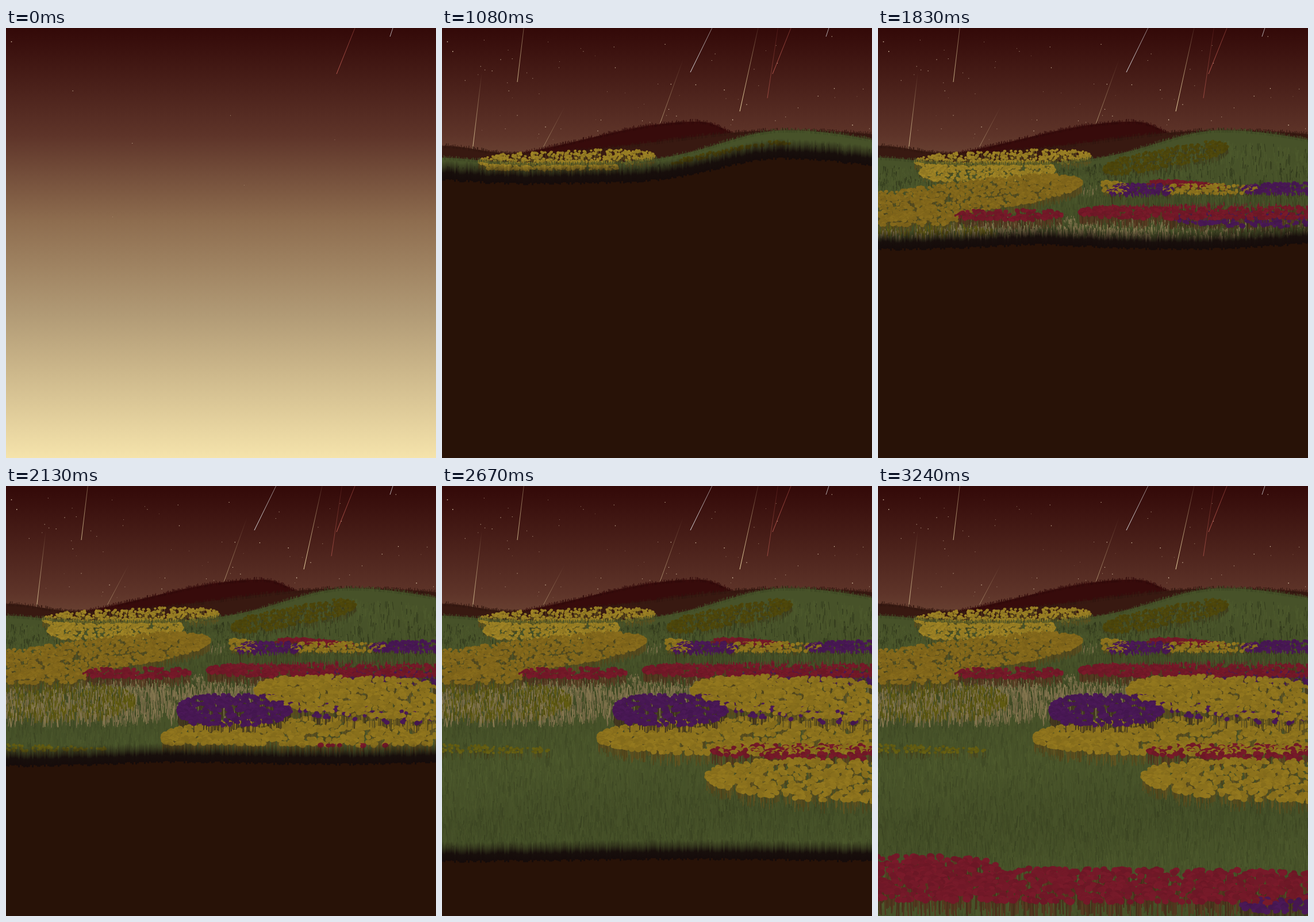
These frames come from a looping animation (748x748 px, 9 s). An HTML page with a canvas:

```html
<!DOCTYPE html>
<html lang="en">
<head>
<meta charset="utf-8">
<title>Meadow under meteors</title>
<style>
  html, body { margin: 0; width: 100%; height: 100%; overflow: hidden; background: #281207; }
  canvas { display: block; width: 748px; height: 748px; }
</style>
</head>
<body>
<canvas id="stage" width="748" height="748"></canvas>
<script>
const SIZE = 748, LOOP = 9000, STEP = 30;
const stage = document.getElementById('stage').getContext('2d');
const layer = document.createElement('canvas');
layer.width = layer.height = SIZE;
const ctx = layer.getContext('2d');

let seed = 7;
const rnd = () => {
  seed = (seed + 0x6D2B79F5) | 0;
  let n = Math.imul(seed ^ (seed >>> 15), 1 | seed);
  n = (n + Math.imul(n ^ (n >>> 7), 61 | n)) ^ n;
  return ((n ^ (n >>> 14)) >>> 0) / 4294967296;
};
const between = (a, b) => a + (b - a) * rnd();
const mix = (a, b, k) => a + (b - a) * k;
const shade = (rgb, k) => `rgb(${rgb.map(v => Math.min(255, Math.round(v * k)))})`;

const GREEN = [71, 82, 41], BEIGE = [132, 118, 79], GOLD = [152, 126, 36], YELLOW = [140, 114, 29],
      AMBER = [130, 103, 27], OLIVE = [98, 92, 18], MOSS = [77, 70, 11], RED = [115, 25, 40],
      PURPLE = [72, 24, 84], MAROON = [55, 11, 11], BROWN = [56, 25, 17],
      CREAM = [255, 236, 180], PALE = [235, 240, 245], CORAL = [230, 110, 100];

// Terrain profiles: bell curves with separate left and right widths.
const bump = (x, peak, left, right = left) =>
  Math.exp(-(((x - peak) / (x < peak ? left : right)) ** 2) / 2);
const maroonHill = x => 240 - 77 * bump(x, 445, 195, 75);
const brownHill = x => 224 - 18 * bump(x, 0, 60) - 46 * bump(x, 600, 210, 260);
const greenHill = x => 236 - 10 * bump(x, 0, 60) - 58 * bump(x, 600, 115, 180);
const fronts = [
  [1020, x => greenHill(x) + 30],
  [1380, x => 303 + 11 * bump(x, 0, 100) - 6 * bump(x, 250, 80) + 27 * bump(x, 650, 95, 140)],
  [1830, x => 386 - 8 * bump(x, 280, 90) - 11 * bump(x, 780, 90)],
  [2430, x => 590 - 8 * bump(x, 430, 170)],
  [2940, () => 726],
  [3240, () => 850]
];

// Lower edge of the meadow at a moment, and the moment it reaches a height.
function front(x, t) {
  let i = 0;
  while (i < fronts.length - 2 && t > fronts[i + 1][0]) i++;
  const [t0, from] = fronts[i], [t1, to] = fronts[i + 1];
  return mix(from(x), to(x), Math.max(0, Math.min(1, (t - t0) / (t1 - t0))));
}
function timeAt(x, y) {
  let t = 1050;
  while (t < 3240 && front(x, t) < y) t += STEP;
  return t;
}

const items = [];
const add = (t, y, draw) => items.push({ t: Math.floor(t / STEP) * STEP, y, draw });

function stroke(x0, y0, x1, y1, width, style) {
  ctx.lineWidth = width;
  ctx.strokeStyle = style;
  ctx.beginPath();
  ctx.moveTo(x0, y0);
  ctx.lineTo(x1, y1);
  ctx.stroke();
}

function addBlade(t, x, y, height, width, style) {
  const lean = between(-.15, .15) * height;
  add(t, y, () => stroke(x, y, x + lean, y - height, width, style));
}

function addStar(t) {
  const x = between(0, SIZE), y = between(0, 374), size = between(.6, 1.5), alpha = between(.4, .95);
  add(t, y, () => {
    ctx.fillStyle = `rgba(255,240,205,${alpha})`;
    ctx.fillRect(x, y, size, size);
  });
}

let meteors = 0;
function addMeteor(x, y, slope, rgb, alpha = .7) {
  const length = 160;
  add(Math.max(0, meteors++ - 1) * 60, y, () => {
    const g = ctx.createLinearGradient(x, y, x + slope * length, y - length);
    g.addColorStop(0, `rgba(${rgb},${alpha})`);
    g.addColorStop(1, `rgba(${rgb},0)`);
    stroke(x, y, x + slope * length, y - length, 1, g);
  });
}

function addHill(t, profile, rgb) {
  add(t, 0, () => {
    ctx.fillStyle = shade(rgb, 1);
    ctx.beginPath();
    ctx.moveTo(0, SIZE);
    for (let x = 0; x <= SIZE; x += 4) ctx.lineTo(x, profile(x));
    ctx.lineTo(SIZE, SIZE);
    ctx.fill();
  });
  for (let x = 0; x < SIZE; x += 1.6)
    addBlade(t, x, profile(x) + 4, between(4, 9), 1, shade(rgb, between(.8, 1.05)));
}

// A spindle-shaped bed from (x0,y0) to (x1,y1), planted when the front is `lift` below it.
function plant(cover, area, x0, x1, y0, y1, half, lift, place) {
  const count = cover * Math.abs(x1 - x0) * half * 1.8 / area;
  for (let i = 0; i < count; i++) {
    const u = rnd(), x = mix(x0, x1, u);
    const taper = Math.sqrt(1 - Math.abs(2 * u - 1) ** 4);
    const y = mix(y0, y1, u) + between(-1, 1) * half * taper;
    if (x > -12 && x < SIZE + 12) place(x, y, timeAt(x, y + lift));
  }
}

function flowers(rgb, x0, x1, y0, y1, half, size, lift, cover = 2) {
  plant(cover, 2 * size * size, x0, x1, y0, y1, half, lift, (x, y, t) => {
    const r = size * between(.7, 1.1), tilt = between(-.5, .5);
    const head = shade(rgb, between(.93, 1.06));
    const stem = shade([mix(rgb[0], 75, .6), mix(rgb[1], 75, .7), 34], between(.75, 1));
    add(t, y, () => {
      stroke(x, y, x + tilt * 3, y + size * 4.5, size * .35, stem);
      ctx.fillStyle = head;
      ctx.beginPath();
      ctx.ellipse(x, y, r, r * .8, tilt, 0, 7);
      ctx.fill();
    });
  });
}

function tufts(rgb, x0, x1, y0, y1, half, height, lift, cover = 1.2) {
  plant(cover, 1.5 * height, x0, x1, y0, y1, half, lift, (x, y, t) =>
    addBlade(t, x, y + height / 2, height * between(.7, 1.2), between(1, 2), shade(rgb, between(.82, 1.06))));
}

// Sky
for (let i = 0; i < 175; i++) addStar(i < 7 ? 0 : between(30, 720));
addMeteor(668, 15, .33, PALE);
addMeteor(575, 80, .4, CORAL);
addMeteor(131, 94, .12, CREAM);
addMeteor(50, 238, .12, CREAM, .9);
addMeteor(128, 298, .53, CREAM, .9);
addMeteor(162, 366, .19, CREAM);
addMeteor(270, 363, .45, CORAL, .9);
addMeteor(296, 332, .18, CREAM, .4);
addMeteor(362, 214, .36, CREAM);
addMeteor(432, 77, .49, PALE, .9);
addMeteor(518, 145, .22, CREAM, .9);
addMeteor(566, 122, .15, CORAL, .5);
addMeteor(505, 315, .14, CORAL, .15);

// Hills
addHill(750, maroonHill, MAROON);
addHill(780, brownHill, BROWN);
addHill(1050, greenHill, GREEN);

// Grass
for (let i = 0; i < 25000; i++) {
  const t = between(1050, 3240), x = between(-4, SIZE + 4), y = front(x, t) - 8;
  const valley = bump(x, 350, 55) * bump(y, 242, 12);
  const light = (1 + .05 * Math.sin(y / 36 + x / 400)) * (1 - .38 * valley);
  const dark = rnd() < .2 ? (y < 290 ? .75 : .9) : 1;
  addBlade(t, x, y, between(9, 14) + y * .012, between(1, 2.4), shade(GREEN, light * dark * between(.94, 1.05)));
}

// Far slope
flowers(GOLD, 64, 370, 233, 222, 14, 2.8, 24, 1);
flowers(GOLD, 72, 308, 252, 246, 18, 2.8, 24, 1.6);
flowers(MOSS, 392, 608, 246, 206, 17, 2.8, 24, 1.2);
tufts(BEIGE, 345, 500, 287, 291, 8, 13, 12, .8);
flowers(RED, 468, 740, 270, 298, 10, 3.2, 22);

// Middle slope
tufts(GREEN, 375, 840, 292, 296, 14, 14, 42, 3);
flowers(RED, 483, 580, 268, 274, 5, 3.4, 60);
flowers(YELLOW, 387, 434, 275, 280, 10, 3.6, 60);
flowers(YELLOW, 495, 660, 281, 280, 9, 3.6, 60, 1.4);
flowers(PURPLE, 400, 512, 283, 282, 11, 3.6, 60);
flowers(PURPLE, 635, 850, 281, 278, 11, 3.6, 60);
tufts(GREEN, 350, 900, 300, 298, 5, 14, 60, 3);
flowers(AMBER, -200, 354, 338, 268, 27, 3.6, 40);
flowers(AMBER, -60, 142, 331, 332, 12, 4, 40, 1.4);
flowers(RED, 136, 320, 326, 325, 9, 4, 40);
flowers(RED, 350, 900, 320, 316, 14, 4, 40);
flowers(PURPLE, 512, 1000, 331, 338, 13, 4.2, 32, 1.5);

// Near slope
tufts(BEIGE, 110, 900, 356, 354, 20, 18, 10);
tufts(BEIGE, -80, 480, 386, 376, 30, 18, 18);
tufts(OLIVE, -140, 225, 376, 376, 30, 14, 22);
flowers(YELLOW, 434, 1100, 354, 396, 35, 5, 58, 2.4);
flowers(PURPLE, 300, 494, 391, 388, 27, 4.8, 50, 2.4);
flowers(PURPLE, 470, 740, 384, 406, 12, 4.6, 50, .5);
flowers(YELLOW, 271, 1100, 438, 428, 32, 5.2, 33, 2.4);
flowers(OLIVE, -100, 190, 455, 459, 7, 3, 26, .7);
flowers(RED, 470, 1000, 461, 466, 13, 5, 33, 1.6);
flowers(YELLOW, 461, 1100, 504, 526, 36, 5.4, 33);

// Foreground
flowers(RED, -300, 206, 656, 658, 14, 6.6, 92);
flowers(RED, -300, 1100, 690, 700, 29, 6.6, 92, 2.4);
flowers(PURPLE, 632, 1000, 730, 722, 14, 6, 92, 1.4);

items.sort((a, b) => a.t - b.t || a.y - b.y);

const sky = ctx.createLinearGradient(0, 0, 0, SIZE);
['#330908', '#5e3429', '#8e6d4f', '#b29b76', '#f5e3ab']
  .forEach((c, i) => sky.addColorStop([0, .25, .45, .67, 1][i], c));

// Shadow above the edge, bare soil below it, in coordinates local to the edge.
const soil = stage.createLinearGradient(0, -34, 0, 0);
soil.addColorStop(0, 'rgba(21,11,10,0)');
soil.addColorStop(.3, 'rgba(21,11,10,.4)');
soil.addColorStop(.6, 'rgba(21,11,10,.95)');
soil.addColorStop(.96, '#150b0a');
soil.addColorStop(1, '#281207');

let drawn = 0, shown = Infinity;
function render(t) {
  if (t < shown) {
    drawn = 0;
    ctx.fillStyle = sky;
    ctx.fillRect(0, 0, SIZE, SIZE);
  }
  shown = t;
  while (drawn < items.length && items[drawn].t <= t) items[drawn++].draw();
  stage.drawImage(layer, 0, 0);
  if (t < 750) return;
  stage.fillStyle = soil;
  for (let x = 0; x < SIZE; x += 3) {
    stage.setTransform(1, 0, 0, 1, x, Math.round(front(x, t) + 2 * Math.sin(x * x)));
    stage.fillRect(0, -34, 3, SIZE);
  }
  stage.resetTransform();
}

const start = performance.now();
function tick() {
  const t = Math.floor(((performance.now() - start) % LOOP) / STEP) * STEP;
  if (t !== shown) render(t);
  requestAnimationFrame(tick);
}
tick();
</script>
</body>
</html>
```
